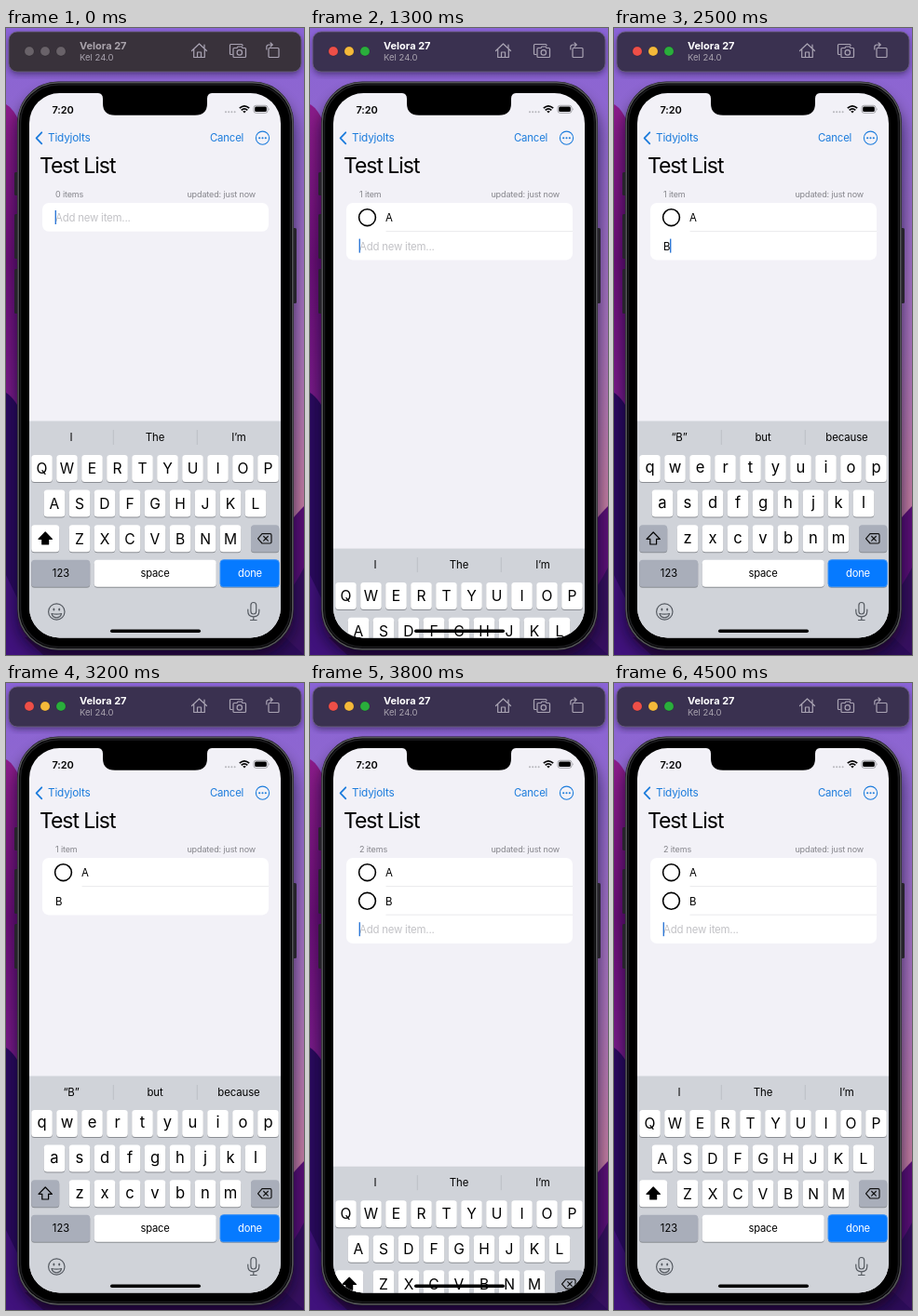
An HTML page for the animation above (4.6 s loop, 320 by 674 pixels).

```html
<!DOCTYPE html>
<html lang="en">
<head>
<meta charset="utf-8">
<title>List entry demo</title>
<style>
  html, body { margin: 0; width: 100%; height: 100%; overflow: hidden; background: #4a1470; }
  svg { display: block; width: 100%; height: 100%; }
  text { font-family: Inter, Roboto, "Liberation Sans", sans-serif; }
  .line { fill: none; stroke-linecap: round; stroke-linejoin: round; }
  .body { font-size: 11.4px; letter-spacing: -.2px; }
  .note { font-size: 9px; letter-spacing: -.13px; fill: #85858b; }
  .mid { text-anchor: middle; }
  .blue { fill: #1c7cdc; }
</style>
</head>
<body>
<svg id="stage" viewBox="0 0 320 674" preserveAspectRatio="none">
  <defs>
    <linearGradient id="sky" x1="0" y1="0" x2="0" y2="1">
      <stop offset="0" stop-color="#8a63d6"/>
      <stop offset=".2" stop-color="#9068cc"/>
      <stop offset=".5" stop-color="#a873bd"/>
      <stop offset=".75" stop-color="#c07ba4"/>
    </linearGradient>
    <linearGradient id="hill" x1="0" y1="0" x2="0" y2="1">
      <stop offset="0" stop-color="#8a1c8a"/>
      <stop offset=".5" stop-color="#6a0f78"/>
      <stop offset="1" stop-color="#7a1c8c"/>
    </linearGradient>
    <clipPath id="screen"><rect x="25" y="70" width="270" height="585.5" rx="32.500"/></clipPath>
    <filter id="soft" x="-10%" y="-10%" width="120%" height="120%"><feGaussianBlur stdDeviation="3"/></filter>
    <filter id="wide" x="-10%" y="-10%" width="120%" height="120%"><feGaussianBlur stdDeviation="8"/></filter>
  </defs>

  <!-- wallpaper -->
  <rect width="320" height="674" fill="url(#sky)"/>
  <path d="M0 82Q8 86 16 104V420H0Z" fill="url(#hill)"/>
  <path d="M0 392Q10 398 20 420L60 674H0Z" fill="#2b0a60"/>
  <path d="M0 588L18 625L60 674H0Z" fill="#40127c"/>
  <path d="M320 514Q313 521 304 532L260 674H320Z" fill="#5a1078"/>
  <path d="M320 580Q310 600 290 625V674H320Z" fill="#36105f"/>
  <path d="M20 655H300L320 674H40Z" fill="#2c0c58"/>

  <!-- simulator bar -->
  <rect x="3" y="7" width="314" height="43" rx="9" fill="#241343" opacity=".55" filter="url(#soft)"/>
  <rect id="bar" x="3" y="4" width="314" height="43" rx="9" stroke="#6b617c" stroke-width=".8"/>
  <g id="lights" stroke="#000" stroke-opacity=".18" stroke-width=".8"></g>
  <text id="device" x="79" y="23.3" font-size="11" font-weight="700">Velora 27</text>
  <text x="79" y="34.8" font-size="9.5" fill="#aaa4b0">Kel 24.0</text>
  <g class="line" stroke="#aaa4b4" stroke-width="1.2">
    <path d="M199.500 24.500L207.500 17L215.500 24.500M201.700 23V31.500H213.300V23M205.500 31.500V26H209.500V31.500M213 18V21.500"/>
    <path d="M243 28.500H241.500Q240.500 28.500 240.500 27.500V18.500Q240.500 17.500 241.500 17.500H253Q254 17.500 254 18.500V19"/>
    <path d="M245 21.500H248L249 20H253L254 21.500H256.500Q257.500 21.500 257.500 22.500V30.500Q257.500 31.500 256.500 31.500H245Q244 31.500 244 30.500V22.500Q244 21.500 245 21.500Z"/>
    <circle cx="250.800" cy="26.400" r="2.700"/>
    <rect x="282" y="21.500" width="11" height="10" rx="1"/>
    <path d="M279.800 23V20.500Q279.800 18 282.500 18H286M284 15.800L286.200 18L284 20.200"/>
  </g>

  <!-- phone -->
  <rect x="12" y="70" width="297" height="606" rx="44" fill="#0c0418" opacity=".7" filter="url(#wide)"/>
  <g fill="#26232b">
    <rect x="9" y="155" width="5" height="25" rx="1.500"/>
    <rect x="9" y="200" width="5" height="48" rx="1.500"/>
    <rect x="9" y="259" width="5" height="48" rx="1.500"/>
    <rect x="307" y="215" width="5" height="81" rx="1.500"/>
  </g>
  <rect x="12" y="57.500" width="297" height="611.500" rx="44" fill="#1b1b1d"/>
  <rect x="13.200" y="58.700" width="294.600" height="609.100" rx="43" fill="#000" stroke="#55555a" stroke-width="1.500"/>
  <rect x="15.500" y="61" width="290" height="604.500" rx="41" fill="#000" stroke="#1d1d20" stroke-width="1.500"/>

  <g clip-path="url(#screen)">
    <rect x="25" y="70" width="270" height="586" fill="#f2f1f7"/>
    <path d="M99 69V70Q104 70.500 104 76V81Q104 93.700 117 93.700H203Q216 93.700 216 81V76Q216 70.500 221 70V69Z"/>
    <text class="mid" x="61" y="91.500" font-size="11" font-weight="600" letter-spacing="-.1">7:20</text>
    <g id="signal" fill="#b5b5ba"></g>
    <g class="line" stroke="#000" stroke-width="1.700" style="stroke-linecap:butt">
      <path d="M250.800 86.200Q256 81.400 261.200 86.200M252.700 88.400Q256 85.300 259.300 88.400"/>
    </g>
    <path d="M254.200 89.600Q256 88.200 257.800 89.600L256 91.500Z"/>
    <rect x="266" y="83.300" width="15" height="8" rx="2.400" fill="none" stroke="#8e8e93" stroke-width=".8"/>
    <rect x="267.200" y="84.500" width="12.600" height="5.600" rx="1.400"/>
    <path d="M282 86V88.700Q283.300 87.400 282 86Z" fill="#8e8e93"/>

    <path class="line" d="M38.300 112.300L32.600 118.300L38.300 124.300" stroke="#1c7cdc" stroke-width="1.800"/>
    <text class="body blue" x="45" y="122.400" style="font-size:11.800px">Tidyjolts</text>
    <text class="body blue" x="219" y="122.400">Cancel</text>
    <circle cx="275.500" cy="118.200" r="7.100" fill="none" stroke="#1c7cdc" stroke-width="1.100"/>
    <g id="more" class="blue"></g>
    <text x="36" y="156.300" font-size="23" letter-spacing="-1.050">Test List</text>
    <text id="total" class="note" x="53" y="182"></text>
    <text class="note" x="268" y="182" text-anchor="end">updated: just now</text>

    <rect id="card" x="39" y="188" width="243" rx="7" fill="#fff"/>
    <g id="rows"></g>
    <g id="entry">
      <text id="hint" class="body" x="53" y="208" fill="#c2c2c6">Add new item...</text>
      <text id="typed" class="body" x="53" y="208"></text>
      <rect id="caret" y="196" width="1.400" height="15" fill="#2f78d6"/>
    </g>

    <g id="keyboard">
      <rect x="25" y="422.500" width="270" height="234" fill="#d0d3d9"/>
      <path d="M115.300 432V448M205.300 432V448" stroke="#b7bac1" stroke-width=".8"/>
      <g id="words"></g>
      <g id="keys"></g>
      <g class="line" stroke="#555a61" stroke-width="1.200">
        <circle cx="54.300" cy="627.500" r="8.700"/>
        <path d="M49 629.500Q54.300 630.800 59.600 629.500Q58.500 633.800 54.300 633.800Q50.100 633.800 49 629.500Z"/>
        <rect x="262.900" y="617.500" width="5.800" height="12.500" rx="2.900"/>
        <path d="M259.800 625V627Q259.800 632.800 265.800 632.800Q271.800 632.800 271.800 627V625M265.800 632.800V636.500M262.500 636.500H269.100"/>
      </g>
      <g fill="#555a61"><ellipse cx="51.400" cy="625" rx="1" ry="1.500"/><ellipse cx="57.200" cy="625" rx="1" ry="1.500"/></g>
    </g>
    <rect x="112" y="646.400" width="97" height="3.500" rx="1.750"/>
  </g>
  <circle id="touch" cx="248" cy="587" r="14" fill="#b4b4b6" fill-opacity=".75" stroke="#8b8b8e" stroke-width=".9"/>
</svg>

<script>
const LOOP = 4600, TICK = 100, ROW = 30.6, KEYBOARD = 233;
const $ = id => document.getElementById(id);
const set = (id, attrs) => { for (const k in attrs) $(id).setAttribute(k, attrs[k]); };
const show = (id, on) => set(id, { display: on ? 'inline' : 'none' });

// time, finished items, text in the field
const STEPS = [[0, 0, ''], [500, 0, 'A'], [1100, 1, ''], [2450, 1, 'B'], [3550, 2, '']];
const PRESSES = [[800, 1000], [3400, 3480]];
// keyboard leaves, keyboard returns
const BOUNCES = [[1000, 1227], [3470, 3696]];
const WORDS = { '': ['I', 'The', 'I’m'], A: ['“A”', 'and', 'are'], B: ['“B”', 'but', 'because'] };

const dots = (n, x, gap, y, r) =>
  Array.from({ length: n }, (_, i) => `<circle cx="${x + gap * i}" cy="${y}" r="${r}"/>`).join('');
$('lights').innerHTML = dots(3, 25, 17, 25, 5.1);
$('signal').innerHTML = dots(4, 236, 3.2, 90.2, 1);
$('more').innerHTML = dots(3, 272.2, 3.3, 118.2, 1.05);

const key = (x, y, w, fill, id = '') =>
  `<rect x="${x}" y="${y + 1}" width="${w}" height="29" rx="3.500" fill="#8b8e94"/>
   <rect ${id && `id="${id}"`} x="${x}" y="${y}" width="${w}" height="29" rx="3.500" fill="${fill}"/>`;
const label = (x, y, text, size, extra = '') =>
  `<text class="mid" x="${x}" y="${y}" font-size="${size}" ${extra}>${text}</text>`;

function buildKeys() {
  const layout = [['QWERTYUIOP', 38.5, 459], ['ASDFGHJKL', 52, 496.6], ['ZXCVBNM', 79, 534.2]];
  let caps = '', upper = '', lower = '';
  for (const [letters, x0, y] of layout) {
    [...letters].forEach((c, i) => {
      const x = x0 + 27 * i;
      caps += key(x - 11.3, y, 22.6, '#fff');
      upper += label(x, y + 20.3, c, 15.6);
      lower += label(x, y + 19.3, c.toLowerCase(), 16.6);
    });
  }
  const dark = '#a9aeba';
  caps += key(27.2, 534.2, 30, dark, 'shift') + key(263, 534.2, 30.3, dark)
    + key(27.2, 571.7, 63, dark) + key(94.7, 571.7, 131, '#fff') + key(230, 571.7, 63.300, '#067aff', 'done')
    + label(59, 590, '123', 11.2) + label(160, 589.5, 'space', 11.2, 'letter-spacing="-.2"')
    + label(262, 589.5, 'done', 11.2, 'id="doneText" letter-spacing="-.2"')
    + `<path id="arrow" d="M42.200 542L49.400 549.300H45.600V555H38.800V549.300H35Z" stroke="#000" stroke-width="1.200" stroke-linejoin="round"/>
       <path class="line" d="M275 543.700H283.500Q285 543.700 285 545.200V552.500Q285 554 283.500 554H275L270.500 548.850ZM276.700 546.500L281.300 551.200M281.300 546.500L276.700 551.200" stroke="#111" stroke-width="1.200"/>`;
  $('keys').innerHTML = caps + `<g id="upper">${upper}</g><g id="lower">${lower}</g>`;
  $('words').innerHTML = [70, 160, 250].map(x => label(x, 444.3, '', 11.4, 'letter-spacing="-.1"')).join('');
}

function buildRows() {
  $('rows').innerHTML = ['A', 'B'].map((name, i) => `<g id="row${i}" transform="translate(0 ${ROW * i})">
    <circle cx="61.500" cy="203.700" r="8.900" fill="none" stroke="#000" stroke-width="1.600"/>
    <text class="body" x="81" y="208">${name}</text>
    <path d="M81.500 218.600H282" stroke="#e4e4e8" stroke-width=".8"/></g>`).join('');
}

// critically damped spring, 0 to 1
const spring = ms => {
  const p = Math.max(0, ms) / 1000 * 18.26;
  return 1 - (1 + p) * Math.exp(-p);
};

function draw(t) {
  const now = STEPS.findLastIndex(s => s[0] <= t);
  const [since, count, text] = STEPS[now];
  const age = t - since;
  const before = now ? STEPS[now - 1][1] : 0;
  const grown = before + (count - before) * Math.min(1, age / 160);

  const active = t >= 100;
  set('bar', { fill: active ? '#3a3150' : '#39323b' });
  set('device', { fill: active ? '#fff' : '#aaa4ac' });
  const tints = active ? ['#ee4f48', '#f4b93a', '#2aae3c'] : Array(3).fill('#696269');
  [...$('lights').children].forEach((dot, i) => dot.setAttribute('fill', tints[i]));

  $('total').textContent = count + (count === 1 ? ' item' : ' items');
  set('card', { height: 30.8 + ROW * grown });
  set('entry', { transform: `translate(0 ${ROW * grown})` });
  for (const i of [0, 1]) set('row' + i, { opacity: Math.max(0, Math.min(1, grown - i)) });
  show('hint', !text);
  $('typed').textContent = text;
  set('caret', { x: text ? 60 : 52.6 });
  show('caret', age % 800 < 500);

  show('upper', !text);
  show('lower', text);
  set('shift', { fill: text ? '#a9aeba' : '#fff' });
  set('arrow', { fill: text ? 'none' : '#000' });
  [...$('words').children].forEach((el, i) => { el.textContent = WORDS[text][i]; });

  const pressed = PRESSES.some(([a, b]) => t >= a && t < b);
  set('done', { fill: pressed ? '#fff' : '#067aff', stroke: pressed ? 'none' : '#3a92f6' });
  set('doneText', { fill: pressed ? '#000' : '#fff' });
  show('touch', pressed);

  const drop = BOUNCES.reduce((sum, [a, b]) => sum + spring(t - a) - spring(t - b), 0);
  set('keyboard', { transform: `translate(0 ${(KEYBOARD * drop).toFixed(2)})` });
}

buildKeys();
buildRows();
const start = performance.now();
function frame() {
  const t = (performance.now() - start) % LOOP;
  draw(Math.floor(t / TICK) * TICK);
  requestAnimationFrame(frame);
}
frame();
</script>
</body>
</html>
```
